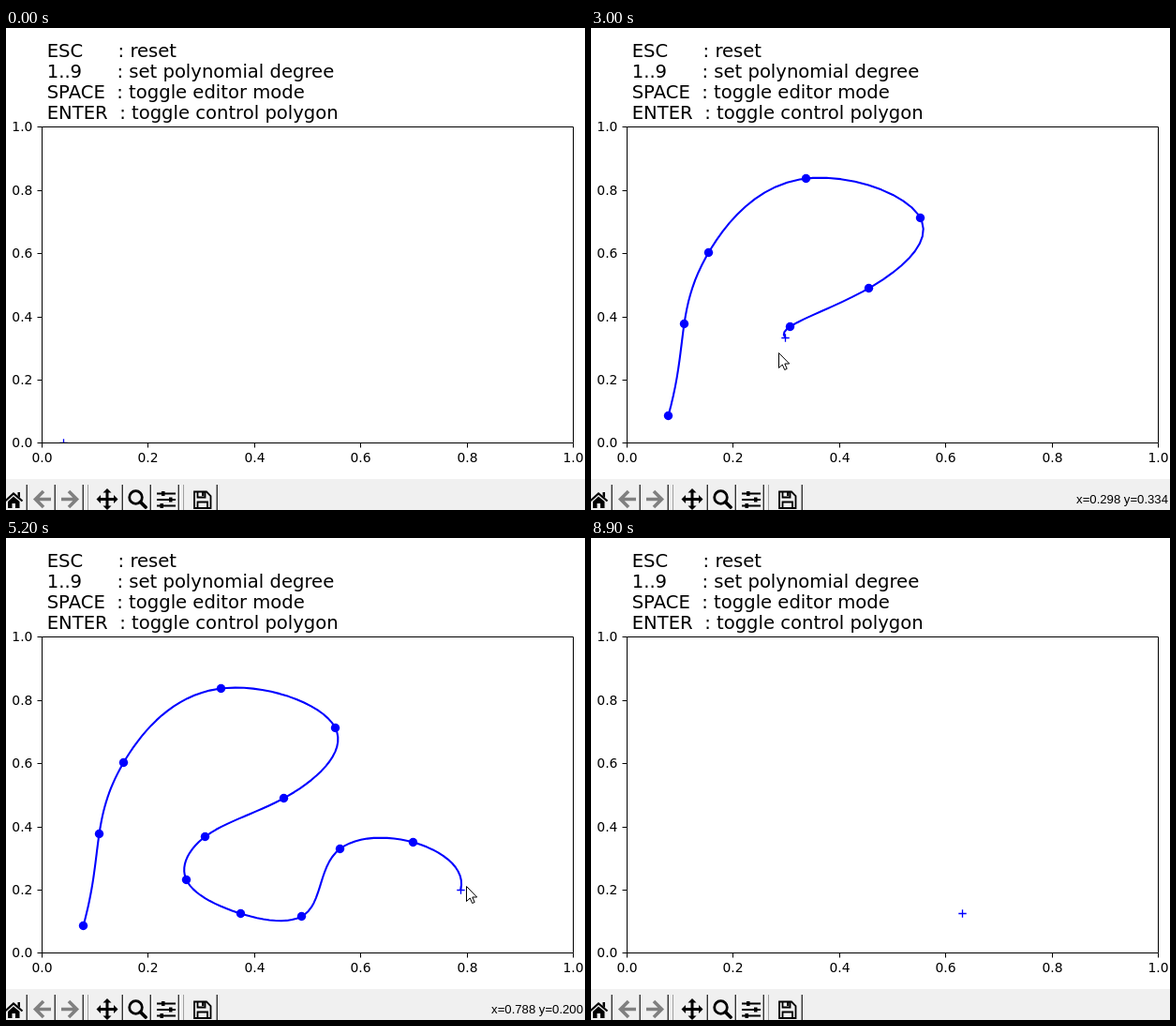
Animation, 618 px wide and 514 px high, one loop 9700 ms. Source, as an HTML page:

```html
<!DOCTYPE html>
<html lang="en">
<head>
<meta charset="utf-8">
<title>Spline editor</title>
<style>
  html, body { margin: 0; width: 100%; height: 100%; overflow: hidden; background: #fff; }
  svg { display: block; width: 618px; height: 514px; }
  text { font-family: "DejaVu Sans", sans-serif; white-space: pre; }
  .help { font-size: 19.6px; }
  .tick { font-size: 13.89px; }
  .status { font: 13.15px "Liberation Sans", Arial, sans-serif; text-anchor: end; }
  .curve { fill: none; stroke: #00f; stroke-width: 2.08; stroke-linejoin: round; }
  .hull { fill: none; stroke: #00f; stroke-width: 1; stroke-dasharray: 5 2.5; }
  .line { fill: none; stroke: #000; }
</style>
</head>
<body>
<svg viewBox="0 0 618 514">
  <defs><clipPath id="area"><rect x="38" y="105" width="567" height="337"/></clipPath></defs>
  <rect width="618" height="514" fill="#fff"/>
  <g id="labels"></g>

  <g transform="translate(.5 .5)">
    <g clip-path="url(#area)">
      <path id="hull" class="hull"/>
      <path id="curve" class="curve"/>
      <g id="dots" fill="#00f"></g>
      <path id="plus" d="M-4.2 0H4.2M0-4.2V4.2" stroke="#00f" stroke-width="1.3"/>
    </g>
    <path id="axes" class="line"/>
  </g>

  <rect y="481" width="618" height="33" fill="#f0f0f0"/>
  <g id="buttons" shape-rendering="crispEdges"></g>
  <g id="icons">
    <path d="M-1 504.500L8 496.500 17.500 504.500" fill="none" stroke="#000" stroke-width="2.200"/>
    <path d="M2 505L8 499.500 14.500 505V512H10V507H6.500V512H2ZM12.500 495H15V501L12.500 499Z"/>
    <g id="back" fill="none" stroke="#808080" stroke-width="3.600">
      <path d="M40 494L31.500 502.500 40 511M32 502.500H48"/>
    </g>
    <use href="#back" transform="matrix(-1 0 0 1 107 0)"/>
    <g transform="translate(108 502.500)">
      <path d="M-8 0H8M0-8V8" stroke="#000" stroke-width="3"/>
      <path id="tip" d="M0-11.500L4.500-7H-4.500Z"/>
      <use href="#tip" transform="rotate(90)"/>
      <use href="#tip" transform="rotate(180)"/>
      <use href="#tip" transform="rotate(270)"/>
    </g>
    <g fill="none" stroke="#000">
      <circle cx="138.500" cy="500.500" r="6.800" stroke-width="2.800"/>
      <path d="M143.500 505.500L149 511" stroke-width="3.800" stroke-linecap="round"/>
    </g>
    <path d="M161 496.500H181M161 503H181M161 509.500H181" stroke="#000" stroke-width="1.800"/>
    <path d="M166 494h3.500v5h-3.500zM174 500.500h3.500v5h-3.500zM164.500 507h3.500v5h-3.500z"/>
    <g fill="none" stroke="#000" stroke-width="1.800">
      <path d="M201 494.500H214L218.500 499V512H201Z"/>
      <path d="M204.500 495V500.500H212.500V495M204.500 512V505.500H215V512"/>
    </g>
    <path d="M209 495h2.500v4h-2.500z"/>
  </g>
  <text id="status" class="status" x="616" y="507"></text>
  <path id="mouse" d="M.5 .5V16.500L4.300 13 6.700 18.500 9.200 17.400 6.800 12H11.700Z" fill="#fff" stroke="#000" stroke-width="1"/>
</svg>

<script>
const LOOP = 9700, STEP = 100, DEGREE = 3;
const ENTER = 200, HULL = 7300, RESET = 8700, LEAVE = 8900;
const FIRST = 500, PACE = 400, LEAD = 140;   // click rhythm, pointer lead over the plus
const box = { x: 38, y: 442, w: 567, h: 337 };

// Clicked points, one every PACE ms
const clicks = [
  [82, 413], [99, 315], [125, 239], [229, 160], [351, 202], [296, 277], [212, 318],
  [192, 364], [250, 400], [315, 403], [356, 331], [434, 324], [486, 376], [539, 322]
].map(([x, y], i) => ({ t: FIRST + PACE * i, x, y }));

// Places the pointer passes without a click
const passes = [
  { t: 0, x: 61, y: 442 }, { t: ENTER, x: 61, y: 442 },
  { t: 1100, x: 117.4, y: 269.8 }, { t: 2300, x: 323.2, y: 250.6 },
  { t: 3900, x: 311.9, y: 404.6 }, { t: 5200, x: 484.8, y: 374.6 },
  { t: 6700, x: 543.8, y: 319.7 }, { t: RESET, x: 543.8, y: 319.7 },
  { t: LEAVE, x: 396, y: 400 }, { t: 2 * LOOP, x: 396, y: 400 }
];
const track = [...clicks, ...passes].sort((a, b) => a.t - b.t);

const $ = id => document.getElementById(id);

function add(parent, tag, attrs, text) {
  const el = document.createElementNS("http://www.w3.org/2000/svg", tag);
  for (const k in attrs) el.setAttribute(k, attrs[k]);
  if (text) el.textContent = text;
  parent.append(el);
  return el;
}

function drawStatic() {
  const labels = $("labels");
  ["ESC      : reset", "1..9      : set polynomial degree",
   "SPACE  : toggle editor mode", "ENTER  : toggle control polygon"
  ].forEach((s, i) => add(labels, "text", { class: "help", x: 43.7, y: 31 + 22 * i }, s));

  let d = `M${box.x} ${box.y}h${box.w}v${-box.h}h${-box.w}z`;
  for (let i = 0; i <= 5; i++) {
    const x = Math.round(box.x + box.w * i / 5), y = Math.ceil(box.y - box.h * i / 5);
    const s = (i / 5).toFixed(1);
    d += `M${x} ${box.y}v5M${box.x} ${y}h-5`;
    add(labels, "text", { class: "tick", x: x + .5, y: 463, "text-anchor": "middle" }, s);
    add(labels, "text", { class: "tick", x: 28.4, y: y + 5, "text-anchor": "end" }, s);
  }
  $("axes").setAttribute("d", d);

  const bar = (x, fill) => add($("buttons"), "rect", { x, y: 487, width: 1, height: 27, fill });
  for (let i = 0; i < 7; i++) {
    const x = Math.round(22 + 30.2 * i + 11 * Math.floor(i / 3));
    bar(x - 1, "#a0a0a0");
    bar(x, "#333");
    bar(x + 1, "#fff");
    if (i % 3 === 2) bar(x + 5, "#a0a0a0");
  }
}

function at(t) {
  const i = track.findIndex(k => k.t > t), a = track[i - 1], b = track[i];
  const f = (t - a.t) / (b.t - a.t);
  return { x: a.x + (b.x - a.x) * f, y: a.y + (b.y - a.y) * f };
}

function basis(i, p, u, k) {
  if (p === 0) return u >= k[i] && u < k[i + 1] ? 1 : 0;
  const a = k[i + p] - k[i], b = k[i + p + 1] - k[i + 1];
  return (a ? (u - k[i]) / a * basis(i, p - 1, u, k) : 0) +
         (b ? (k[i + p + 1] - u) / b * basis(i + 1, p - 1, u, k) : 0);
}

function weights(u, n, k) {
  return Array.from({ length: n }, (_, i) => u >= 1 ? +(i === n - 1) : basis(i, DEGREE, u, k));
}

// Interpolating B-spline: centripetal parameters, averaged knots
function fit(pts) {
  const n = pts.length, u = [0];
  for (let i = 1; i < n; i++) {
    const dx = (pts[i].x - pts[i - 1].x) / box.w, dy = (pts[i].y - pts[i - 1].y) / box.h;
    u.push(u[i - 1] + Math.sqrt(Math.hypot(dx, dy)));
  }
  const total = u[n - 1];
  u.forEach((v, i) => u[i] = v / total);
  u[n - 1] = 1;

  const knots = Array(DEGREE + 1).fill(0);
  for (let j = 1; j < n - DEGREE; j++) knots.push((u[j] + u[j + 1] + u[j + 2]) / DEGREE);
  knots.push(...Array(DEGREE + 1).fill(1));

  const rows = u.map((v, i) => [...weights(v, n, knots), pts[i].x, pts[i].y]);
  for (let c = 0; c < n; c++) {
    for (let r = 0; r < n; r++) {
      if (r === c || !rows[r][c]) continue;
      const f = rows[r][c] / rows[c][c];
      for (let j = c; j < n + 2; j++) rows[r][j] -= f * rows[c][j];
    }
  }
  const ctrl = rows.map((r, i) => ({ x: r[n] / r[i], y: r[n + 1] / r[i] }));

  const count = n * n, line = [];
  for (let s = 0; s <= count; s++) {
    const w = weights(s / count, n, knots);
    const sum = axis => ctrl.reduce((v, c, i) => v + c[axis] * w[i], 0);
    line.push({ x: sum("x"), y: sum("y") });
  }
  return { ctrl, line };
}

const path = pts => "M" + pts.map(p => `${p.x.toFixed(2)} ${p.y.toFixed(2)}`).join("L");
const move = (el, p) =>
  el.setAttribute("transform", `translate(${Math.round(p.x)} ${Math.round(p.y)})`);

function render(t) {
  const pos = at(t), inside = t >= ENTER && t < LEAVE;
  const set = t < RESET ? clicks.filter(c => c.t <= t) : [];

  $("dots").replaceChildren();
  for (const c of set) add($("dots"), "circle", { cx: c.x, cy: c.y, r: 4.7 });

  const last = set[set.length - 1];
  const moved = last && Math.hypot(pos.x - last.x, pos.y - last.y) > 1;
  const pts = moved ? [...set, pos] : set;
  const spline = pts.length > DEGREE ? fit(pts) : null;
  $("curve").setAttribute("d", spline ? path(spline.line) : "");
  $("hull").setAttribute("d", spline && t >= HULL ? path(spline.ctrl) : "");

  move($("plus"), pos);
  move($("mouse"), at(t + LEAD));
  $("mouse").style.display = inside ? "" : "none";
  const x = ((pos.x - box.x) / box.w).toFixed(3), y = ((box.y - pos.y) / box.h).toFixed(3);
  $("status").textContent = inside ? `x=${x} y=${y}` : "";
}

let shown = -1;
function tick() {
  const t = Math.floor(performance.now() % LOOP / STEP) * STEP;
  if (t !== shown) render(shown = t);
  requestAnimationFrame(tick);
}

drawStatic();
tick();
</script>
</body>
</html>
```
